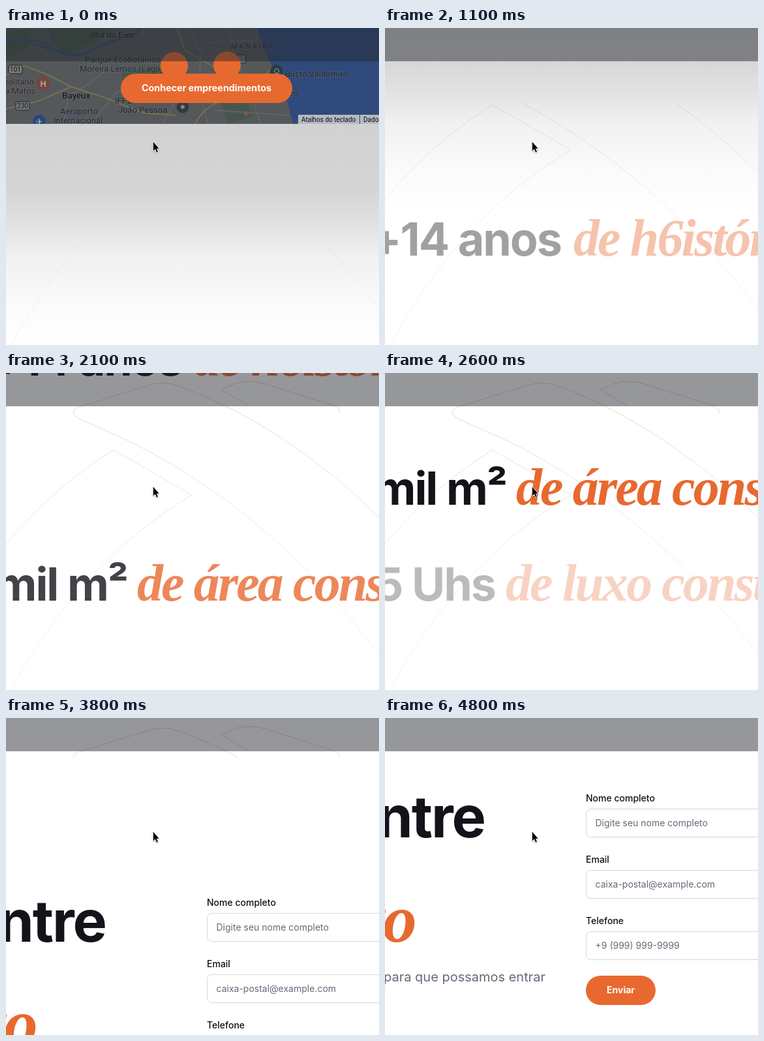
An HTML page with a canvas that plays this animation: 572x486 px, repeating every 4.9 s.

```html
<!DOCTYPE html>
<html lang="pt-BR">
<head>
<meta charset="utf-8">
<title>Empreendimentos</title>
<style>
  html, body { margin: 0; width: 100%; height: 100%; overflow: hidden; background: #fff; }
  canvas { display: block; width: 572px; height: 486px; }
</style>
</head>
<body>
<canvas id="stage" width="572" height="486"></canvas>
<script>
const W = 572, H = 486, LOOP = 4900, STEP = 100;
const ctx = document.getElementById('stage').getContext('2d');
const ORANGE = '#e8692f', INK = '#13131a', GRAY = '#626b78';
const SANS = 'Inter, "Liberation Sans", sans-serif';
const SERIF = '"Liberation Serif", serif';
const MAPFONT = 'Roboto, Arial, sans-serif';

// Scroll position: [ms, px]; a rest, then wheel bursts
const KEYS = [
  [0, 0], [600, 0], [1100, 205], [2100, 796], [2600, 1034],
  [3000, 1285], [3300, 1383], [3800, 1699], [4800, 1859]
];
const END = 1859;        // scroll at which the form is at rest
const PIN_END = 1323;    // scroll at which the pinned section is released
const PANEL = 436;       // scroll length of one line of text
const BASE = 349;        // resting baseline of the lines

const LINES = [
  { a: '+14 anos', b: 'de h6istória', right: 270, left: 289 },
  { a: 'mil m²', b: 'de área construída', right: 186, left: 201 },
  { a: '5 Uhs', b: 'de luxo construído', right: 169, left: 185 }
];

const OUTLINES = [
  'M103 60 Q104 55 112 52 L215 20 Q240 11 265 20 C365 55 485 133 572 222',
  'M103 60 Q104 66 112 70 L190 105 C330 175 462 282 572 432',
  'M0 262 C50 203 105 155 165 118 L285 187 C170 255 75 360 8 486',
  'M372 50 L330 26 L352 16 Q372 10 395 16 L503 50 Q513 53 512 62'
].map(d => new Path2D(d));

const WATER = new Path2D('M383 -10 Q392 30 408 58 Q428 92 440 147 H572 V-10 Z');
const PARKS = [
  'M60 -10 L170 -10 L150 14 L92 42 L70 20 Z',
  'M178 66 L236 58 L262 84 L210 112 L180 96 Z',
  'M330 110 L366 104 L378 136 L340 147 Z',
  'M0 6 L38 0 L30 34 L0 46 Z'
].map(d => new Path2D(d));
const STREETS = [
  'M130 147 L168 100 L210 84 L300 70 L400 78', 'M280 0 L300 40 L294 90 L310 147',
  'M340 0 L352 50 L372 90 L390 147', 'M240 147 L262 108 L330 96 L424 104',
  'M88 147 L96 104 L130 84 L160 60', 'M312 22 L388 18', 'M320 126 L436 134'
].map(d => new Path2D(d));
const HIGHWAYS = [
  'M0 72 L28 58 L60 70 L100 90 L150 106 L210 130 L260 134', 'M0 124 L50 112 L100 90',
  'M290 147 Q306 116 340 110 T408 60', 'M262 0 L274 34 L320 60 L362 46'
].map(d => new Path2D(d));
const RIVER = new Path2D('M0 22 Q40 10 70 30 T128 36 T200 8 L214 -10');

const clamp = v => Math.max(0, Math.min(1, v));

// Monotone cubic interpolation through KEYS
const slopes = KEYS.slice(1).map((k, i) => (k[1] - KEYS[i][1]) / (k[0] - KEYS[i][0]));
const tangents = KEYS.map((k, i) => {
  const p = slopes[i - 1], q = slopes[i];
  return p && q ? 2 * p * q / (p + q) : 0;
});
function scrollAt(t) {
  let i = 0;
  while (i < KEYS.length - 2 && t > KEYS[i + 1][0]) i++;
  const [t0, y0] = KEYS[i], [t1, y1] = KEYS[i + 1];
  const d = t1 - t0, u = clamp((t - t0) / d), v = 1 - u;
  return y0 * v * v * (1 + 2 * u) + y1 * u * u * (3 - 2 * u)
    + d * u * v * (tangents[i] * v - tangents[i + 1] * u);
}

function text(s, x, y, font, color, align = 'left', spacing = 0) {
  ctx.font = font;
  ctx.letterSpacing = spacing + 'px';
  ctx.fillStyle = color;
  ctx.textAlign = align;
  ctx.fillText(s, x, y);
  ctx.letterSpacing = '0px';
}

function headline(s, x, y, size, spacing = -2) {
  text(s, x, y, `bold ${size}px ${SANS}`, INK, 'right', spacing);
}

function accent(s, x, y, size, align) {
  text(s, x, y, `italic bold ${size}px ${SERIF}`, ORANGE, align, -size * .036);
}

function rect(x, y, w, h, color) {
  ctx.fillStyle = color;
  ctx.fillRect(x, y, w, h);
}

function round(x, y, w, h, r, fill, stroke) {
  ctx.beginPath();
  ctx.roundRect(x, y, w, h, r);
  paint(fill, stroke);
}

function disc(x, y, r, fill, stroke) {
  ctx.beginPath();
  ctx.arc(x, y, r, 0, 7);
  paint(fill, stroke);
}

function paint(fill, stroke) {
  if (fill) { ctx.fillStyle = fill; ctx.fill(); }
  if (stroke) { ctx.strokeStyle = stroke; ctx.lineWidth = 1; ctx.stroke(); }
}

function strokeAll(paths, color, width) {
  ctx.strokeStyle = color;
  ctx.lineWidth = width;
  paths.forEach(p => ctx.stroke(p));
}

function label(s, x, y, size = 13, color = '#17191c') {
  ctx.font = size + 'px ' + MAPFONT;
  ctx.textAlign = 'left';
  ctx.lineWidth = 2;
  ctx.strokeStyle = 'rgba(110,114,118,.45)';
  ctx.strokeText(s, x, y);
  ctx.fillStyle = color;
  ctx.fillText(s, x, y);
}

function shield(s, x, y) {
  round(x, y, 21, 13, 3, '#77797b', '#202326');
  text(s, x + 10.5, y + 10, '10px ' + MAPFONT, '#111', 'center');
}

function drawMap() {
  ctx.save();
  ctx.beginPath();
  ctx.rect(0, 0, W, 147);
  ctx.clip();
  rect(0, 0, W, 147, '#54585b');
  PARKS.forEach(p => { ctx.fillStyle = '#45574d'; ctx.fill(p); });
  strokeAll([RIVER], '#38516f', 4);
  strokeAll(STREETS, '#62676b', 1.5);
  strokeAll(HIGHWAYS, '#77704f', 2);
  ctx.fillStyle = '#2f4a7b';
  ctx.fill(WATER);

  label('Ilha do Eixo', 130, 15);
  ctx.save();
  ctx.translate(32, 24);
  ctx.rotate(.3);
  label('Rio Paraíba', 0, 0, 9, '#20344f');
  ctx.restore();
  label('Parque Ecobotânico', 121, 53, 13, '#1d2c26');
  label('Moreira Lemos (Lago)', 113, 67, 13, '#1d2c26');
  label('M A N A Í R A', 345, 32, 11, '#22262a');
  label('Busto Valdomiro', 428, 75, 13, '#192431');
  label('Bayeux', 86, 108, 13.5, '#0c0d0f');
  label('politano', -4, 87, 13, '#34282a');
  label('ra Matos', -6, 101, 13, '#34282a');
  label('Aeroporto', 83, 132, 13, '#1c2838');
  label('Internacional', 73, 146, 13, '#1c2838');
  label('IFPB', 167, 116, 13, '#20262b');
  label('João Pessoa', 172, 130, 13, '#20262b');
  label('eo', 434, 104, 13, '#192431');
  shield('101', 4, 57);
  shield('230', 15, 113);
  round(354, 41, 14, 13, 3, '#686b6d', '#202326');

  disc(57, 85, 10.5, '#75463f');
  text('H', 57, 90, 'bold 13px ' + MAPFONT, '#b3a39f', 'center');
  disc(51, 143, 10, '#2b4778');
  text('✈', 51, 148, '13px "DejaVu Sans", sans-serif', '#a4adbd', 'center');
  disc(415, 66, 10, '#263d44');
  disc(415, 66, 3.5, null, '#93a0a3');
  disc(271, 121, 9.5, '#343a40');
  disc(271, 121, 3, '#82878b');
  disc(368, 132, 2.5, '#a34d3d');

  rect(448, 133, 94, 14, '#b4bac3');
  rect(543, 133, 29, 14, '#b4bac3');
  text('Atalhos do teclado', 453, 143.5, '10px ' + MAPFONT, '#0b0b0b');
  text('Dados', 548, 143.5, '10px ' + MAPFONT, '#0b0b0b');
  ctx.restore();

  disc(258, 58, 21, ORANGE);
  disc(339, 57, 21, ORANGE);
  round(176, 70, 263, 45, 22.5, ORANGE);
  text('Conhecer empreendimentos', 307.5, 97, 'bold 14.3px ' + SANS, '#fff', 'center');
}

function drawFade() {
  const g = ctx.createLinearGradient(0, 147, 0, 487);
  [[0, 209], [.3, 213], [.45, 225], [.6, 241], [.82, 251], [1, 255]]
    .forEach(([p, v]) => g.addColorStop(p, `rgb(${v},${v},${v})`));
  rect(0, 147, W, 340, g);
}

function drawOutlines(scroll) {
  const top = 320 - scroll, bottom = Math.min(H, PIN_END + PANEL - scroll);
  if (bottom <= 0) return;
  ctx.save();
  ctx.beginPath();
  ctx.rect(0, top, W, bottom - top);
  ctx.clip();
  const g = ctx.createLinearGradient(0, 0, 0, H);
  g.addColorStop(0, 'rgba(222,140,108,.5)');
  g.addColorStop(.25, 'rgba(226,150,122,.36)');
  g.addColorStop(.6, 'rgba(225,180,165,.28)');
  g.addColorStop(1, 'rgba(220,190,180,.22)');
  strokeAll(OUTLINES, g, .9);
  ctx.restore();
}

function drawLines(scroll) {
  LINES.forEach((line, i) => {
    const start = 15 + PANEL * i;
    const y = BASE - Math.max(0, scroll - start - PANEL);
    ctx.globalAlpha = clamp((scroll - start - 35) / 387);
    if (!ctx.globalAlpha || y < -30) return;
    headline(line.a, line.right, y, 70);
    accent(line.b, line.left, y, 80);
  });
  ctx.globalAlpha = 1;
}

function field(name, hint, y) {
  text(name, 308, y, '500 14px ' + SANS, '#111114');
  round(308.5, y + 11.5, 320, 43, 7, '#fff', '#d3d6dc');
  text(hint, 322.5, y + 38, '14px ' + SANS, GRAY);
}

function drawForm() {
  headline('Entre', 153, 183, 88);
  accent('ro', 45, 343, 104, 'right');
  text('para que possamos entrar', 246, 404, '20px ' + SANS, GRAY, 'right');
  field('Nome completo', 'Digite seu nome completo', 128);
  field('Email', 'caixa-postal@example.com', 222);
  field('Telefone', '+9 (999) 999-9999', 316);
  round(308, 395, 107, 45, 22.5, ORANGE);
  text('Enviar', 361.5, 422, 'bold 14px ' + SANS, '#fff', 'center');
}

const ARROW = new Path2D('M225.8 174.5 V188.5 L228.8 185.6 L231 190.6 L233 189.7 L230.9 184.8 H234.6 Z');
function drawCursor() {
  ctx.save();
  ctx.shadowColor = 'rgba(0,0,0,.3)';
  ctx.shadowBlur = 2;
  ctx.shadowOffsetY = 1;
  ctx.lineJoin = 'round';
  strokeAll([ARROW], '#fff', 1.6);
  ctx.restore();
  ctx.fillStyle = '#000';
  ctx.fill(ARROW);
}

function shifted(dy, draw) {
  ctx.save();
  ctx.translate(0, dy);
  draw();
  ctx.restore();
}

function render(t) {
  const scroll = scrollAt(t);
  rect(0, 0, W, H, '#fff');
  if (scroll < 487) shifted(-scroll, drawFade);
  drawOutlines(scroll);
  if (scroll < 150) shifted(-scroll, drawMap);
  drawLines(scroll);
  if (scroll > PIN_END) shifted(END - scroll, drawForm);
  rect(0, 0, W, 51, 'rgba(36,38,44,.48)');
  drawCursor();
}

const begin = performance.now();
function tick() {
  const t = (performance.now() - begin) % LOOP;
  render(Math.floor(t / STEP) * STEP);
  requestAnimationFrame(tick);
}
tick();
</script>
</body>
</html>
```
